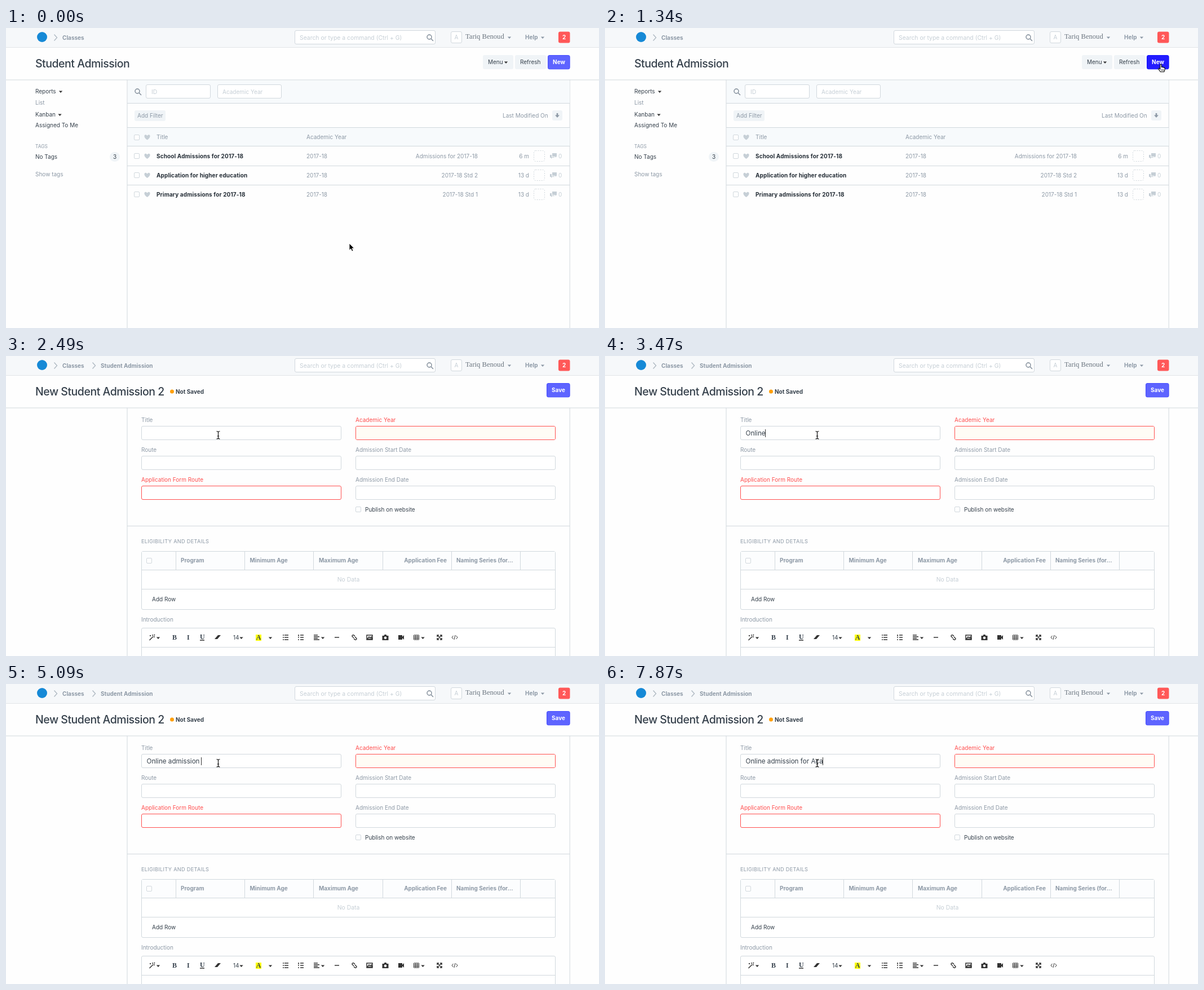
Animation of 1052 by 532 pixels, one loop 8 s. Source, as an HTML page:

```html
<!DOCTYPE html>
<html lang="en">
<head>
<meta charset="utf-8">
<title>Student Admission</title>
<style>
  html, body { margin: 0; width: 100%; height: 100%; overflow: hidden; background: #fefefe; }
  svg { display: block; width: 1052px; height: 532px; }
  text { font: 400 10px Inter, sans-serif; font-optical-sizing: none; fill: #36414c; white-space: pre; }
  .soft { fill: #8d99a6; }
  .pale { fill: #c6cfd6; }
  .red { fill: #ff4d4d; }
  .white { fill: #fff; }
  .bold { font-weight: 700; }
  .strong { font-weight: 700; letter-spacing: .12px; fill: #242d36; }
  .end { text-anchor: end; }
  .mid { text-anchor: middle; }
  .title { font-size: 19.5px; font-weight: 500; letter-spacing: -.48px; }
  .caps { font-size: 8.4px; }
  .section { font-size: 9.2px; letter-spacing: .3px; }
  .hint { font-size: 10.4px; }
  .user { font: 12.6px "Liberation Serif", serif; fill: #6c7680; }
  .typed { font-size: 11.65px; }
  .serif { font: bold 12px "Liberation Serif", serif; }
  .line { fill: none; stroke: #d1d8dd; }
  .faint { opacity: .6; }
  .box { fill: #fff; stroke: #d1d8dd; }
  .need { stroke: #ff4f4f; }
  .nav { fill: #f6f8fa; }
  .tint { fill: #f7fafc; }
  .head { fill: #fcfdfe; }
  .btn { fill: #f0f4f7; }
  .badge { fill: #ff5858; }
  .blue { fill: #5e64ff; stroke: #444bff; }
  .blue.hover { fill: #231cff; stroke: #0f10ff; }
  .ink { fill: #333; }
  .stroke { fill: none; stroke: #333; stroke-width: 1.5; }
  .lens { fill: none; stroke: #7c8895; stroke-width: 1.4; }
  .chevron { fill: none; stroke: #b0bac3; stroke-width: 1.4; }
</style>
</head>
<body>
<svg viewBox="0 0 1052 532">
  <g id="frame"></g>
  <g id="list"></g>
  <g id="form"></g>
  <g id="typing">
    <text id="typed" class="typed" x="249.5" y="141"></text>
    <rect id="caret" y="130" width="1" height="14" fill="#333"/>
  </g>
  <g id="arrow">
    <path d="M0 0V12.2L2.8 9.6L4.8 14L7 13L5 8.8H8.8Z" fill="#000" stroke="#fff" stroke-width=".9"/>
  </g>
  <g id="hand">
    <path d="M-1.2 0Q0-1.6 1.2 0V4.2Q2.6 3.4 3.4 4.7Q4.8 4 5.5 5.3Q7 5 7.2 6.6V9L5.8 12.8H-.6L-4.2 7.8Q-4 6-2.4 6.8L-1.2 8Z" fill="#fff" stroke="#000" stroke-width="1.1"/>
    <path d="M1.2 8.2V11M3.1 8.2V11M4.9 8.2V11" stroke="#000" stroke-width=".7"/>
  </g>
  <g id="beam">
    <path d="M-2.5-6.5Q.5-6.5.5-4.5Q.5-6.5 3.5-6.5M.5-5V6M-2.5 7Q.5 7 .5 5Q.5 7 3.5 7M-1.2 2H2.2" fill="none" stroke="#111" stroke-width="1.2"/>
  </g>
</svg>
<script>
const $ = id => document.getElementById(id);

// Drawing helpers; text is placed by the middle of its line.
const text = (x, y, str, cls = '') => `<text x="${x}" y="${y + 3.6}" class="${cls}">${str}</text>`;
const rect = (x, y, w, h, cls, r = 0) => `<rect x="${x}" y="${y}" width="${w}" height="${h}" rx="${r}" class="${cls}"/>`;
const box = (x, y, w, h, cls = 'box', r = 2.5) => rect(x + .5, y + .5, w - 1, h - 1, cls, r);
const path = (d, cls, x = 0, y = 0) => `<path d="${d}" class="${cls}" transform="translate(${x} ${y})"/>`;
const hline = (x, y, w, cls = 'line') => path(`M${x} ${y + .5}h${w}`, cls);
const vline = (x, y, h) => path(`M${x + .5} ${y}v${h}`, 'line');
const drop = (x, y, cls = 'ink') => path('M-3.2-1.5h6.4L0 2z', cls, x, y);
const lens = (x, y) => path('M3-1A4 4 0 1 1-5-1A4 4 0 1 1 3-1M2 2L6 6', 'lens', x, y);
const tick = (x, y) => box(x, y, 10, 10, 'box', 1.5);
const chevron = x => path('M-2.5-5.5L2.5 0L-2.5 5.5', 'chevron', x, 17);
const heart = (x, y) => path('M0 5C-9-1-4-7.5 0-2.5C4-7.5 9-1 0 5z', 'pale', x, y);
const chat = (x, y) => path('M-2-5h8v6h-1v2l-2-2h-5zM-6-2h3v4h5v1h-4l-2 2v-2h-2z', 'pale', x, y);

$('frame').innerHTML =
  rect(0, 0, 1052, 34, 'nav') + hline(0, 34, 1052, 'line faint') +
  '<circle cx="64" cy="16" r="9" fill="#1689d6"/>' +
  chevron(88) + text(100, 17, 'Classes', 'bold soft') +
  box(512, 4, 250, 25) + text(521, 17, 'Search or type a command (Ctrl + G)', 'hint pale') + lens(752, 17) +
  box(789, 6, 20, 21) + text(799, 16.5, 'A', 'pale mid') +
  text(815, 15.5, 'Tariq Benoud', 'user') + drop(893, 17, 'soft') +
  text(921, 16.5, 'Help', 'bold soft') + drop(952, 17, 'soft') +
  rect(980, 6.5, 20.5, 20, 'badge', 3) + text(990.2, 16.5, '2', 'bold white mid') +
  hline(0, 91.5, 1052) + vline(214.5, 92, 440) + vline(999.7, 92, 440);

const rows = [
  ['School Admissions for 2017-18', 'Admissions for 2017-18', '6 m'],
  ['Application for higher education', '2017-18 Std 2', '13 d'],
  ['Primary admissions for 2017-18', '2017-18 Std 1', '13 d']
];
const row = ([name, group, age], i) => {
  const y = 227 + 34 * i;
  return tick(227, y - 5) + heart(250.5, y) + text(267, y, name, 'strong') +
    text(533, y, '2017-18', 'soft') + text(837, y, group, 'soft end') + text(928, y, age, 'soft end') +
    `<rect x="936.5" y="${y - 9.5}" width="19" height="19" rx="3" class="line" stroke-dasharray="2 2"/>` +
    chat(971, y) + text(980, y + .5, '0', 'pale') + (i < 2 ? hline(215, y + 17, 785) : '');
};

$('list').innerHTML =
  text(52, 66, 'Student Admission', 'title') +
  rect(846, 48, 54, 25, 'btn', 3) + text(855, 60.5, 'Menu') + drop(887, 61) +
  rect(903, 48, 55, 25, 'btn', 3) + text(912, 60.5, 'Refresh') +
  '<g id="new" class="blue">' + box(961, 48, 39.6, 25.3, '') + '</g>' + text(981, 60.5, 'New', 'bold white mid" stroke="none') +
  text(52, 112, 'Reports') + drop(97, 113) + text(52, 132, 'List', 'soft') +
  text(52, 153, 'Kanban') + drop(95.5, 154) + text(52, 172.5, 'Assigned To Me') +
  text(52, 209.5, 'TAGS', 'caps soft') + text(52, 228.5, 'No Tags') +
  rect(184, 220, 18, 17, 'btn', 8.5) + text(193, 228.5, '3', 'mid') + text(52, 259, 'Show tags', 'soft') +
  rect(216, 93, 784, 40, 'tint') + hline(215, 133, 785) + lens(234, 113) +
  box(248, 100, 115, 25) + text(258, 113, 'ID', 'hint pale') +
  box(375, 100, 114, 25) + text(384, 113, 'Academic Year', 'pale') +
  rect(228, 146, 55, 19, 'btn', 3) + text(233, 155, 'Add Filter', 'soft') +
  text(881, 155, 'Last Modified On', 'soft') + rect(969, 146, 18, 18, 'btn', 3) +
  path('M-1.3-4h2.6v3.5h2.7L0 4L-4-.5h2.7z', 'soft', 978, 155) +
  hline(215, 176, 785) + rect(216, 177, 784, 32, 'tint') + hline(215, 209, 785) +
  tick(227, 189) + heart(250.5, 193.5) + text(267, 193.5, 'Title', 'soft') + text(533, 193.5, 'Academic Year', 'soft') +
  rows.map(row).join('');

const field = (x, y, label, need) =>
  text(x, y, label, need ? 'red' : 'soft') + box(x, y + 11, 355, 25, need ? 'box need' : 'box');

const tools =
  path('M-4.5 5L2-1.5M1-5v2.2M5-1H2.8M5-5L3.4-3.4M-3-4v2M-4-3h2', 'stroke', 259, 499) + drop(270, 500) +
  text(295, 499.5, 'B', 'serif') + text(321, 499.5, 'I', 'serif" font-style="italic') +
  text(344, 498.5, 'U', 'serif') + path('M-4 5h8', 'stroke', 348, 499) +
  path('M-5 3L1-4H6L0 3zM-4 4H2', 'ink', 375, 499) +
  text(403, 499, '14') + drop(417.5, 500) +
  '<rect x="443" y="494" width="10" height="11" fill="#ff0"/>' + text(448, 499.5, 'A', 'serif mid') + drop(469, 500) +
  path('M-5-4h2M-5 0h2M-5 4h2M-2-4h7M-2 0h7M-2 4h7', 'stroke', 496, 499) +
  path('M-4-5v3M-5 0h2M-5 4h2M-1-4h6M-1 0h6M-1 4h6', 'stroke', 523, 499) +
  path('M-5-4h7M-5-1.3h10M-5 1.4h7M-5 4h10', 'stroke', 551, 499) + drop(562, 500) +
  path('M-4 0h8', 'stroke', 587, 499) +
  path('M-1 1L-4-2Q-4-5-1-4L1-2M1-1L4 2Q4 5 1 4L-1 2', 'stroke', 618, 499) +
  path('M-5-4h10v8h-10zM-4 3L-1-1L1 1L3-1L4 3z', 'stroke', 645, 499) +
  path('M-5.5-3h3l1-2h3l1 2h3v8h-11zM0-1.5a2.3 2.3 0 1 0 .01 0z', 'ink" fill-rule="evenodd', 673, 499) +
  path('M-5-4h7v3L5-4V4L2 1v3h-7z', 'ink', 701, 499) +
  path('M-4.5-4h9v8h-9zM-4.5-1h9M-4.5 1.6h9M-1.5-4v8M1.5-4v8', 'stroke" style="stroke-width:1', 728, 499) + drop(739.5, 500) +
  path('M-4-4L4 4M4-4L-4 4M-4-1v-3h3M1-4h3v3M4 1v3h-3M-1 4h-3v-3', 'stroke', 769, 499) +
  path('M-2.5-3L-5 0L-2.5 3M2.5-3L5 0L2.5 3M1-4L-1 4', 'stroke" style="stroke-width:1', 796, 499);

$('form').innerHTML =
  text(52, 66, 'New Student Admission 2', 'title') +
  '<circle cx="294.5" cy="63" r="3.5" fill="#ffa00a"/>' + text(301, 63, 'Not Saved', 'bold') +
  box(959, 48, 41.6, 25.3, 'blue') + text(980, 60.5, 'Save', 'bold white mid') +
  chevron(156) + text(168, 17, 'Student Admission', 'bold soft') +
  field(240, 113, 'Title') + field(240, 166, 'Route') + field(240, 219, 'Application Form Route', true) +
  field(620, 113, 'Academic Year', true) + field(620, 166, 'Admission Start Date') + field(620, 219, 'Admission End Date') +
  '<rect id="warm" x="621" y="125" width="353" height="23" rx="2" fill="#fffcf5"/>' +
  tick(620, 267) + text(637, 272, 'Publish on website') + hline(215, 301, 785) +
  text(240, 328, 'ELIGIBILITY AND DETAILS', 'section soft') +
  box(240, 346, 735, 104) + rect(241, 347, 733, 32, 'head') + hline(240, 379, 734) + hline(240, 413, 734) +
  [301, 423, 545, 668, 790, 912].map(x => vline(x, 347, 32)).join('') +
  tick(249, 358) + text(310, 362.5, 'Program', 'bold soft') +
  text(432.5, 362.5, 'Minimum Age', 'bold soft') + text(555, 362.5, 'Maximum Age', 'bold soft') +
  text(782, 362.5, 'Application Fee', 'bold soft end') + text(799, 362.5, 'Naming Series (for…', 'bold soft') +
  text(607.5, 396.5, 'No Data', 'hint pale mid') + text(259, 431, 'Add Row') +
  text(240, 467, 'Introduction', 'soft') + box(240, 482, 735, 60) + hline(240, 516, 734) + tools;

// Typing: start time and content; "|" marks a visible caret.
const keys = [
  [1670, '|'], [2490, ''], [2740, 'O|'], [2900, 'On|'], [3150, 'Onl|'],
  [3310, 'Onli|'], [3390, 'Onlin|'], [3470, 'Online|'], [3550, '|'],
  [3800, 'O|'], [3880, 'On|'], [3960, 'Onl|'], [4040, 'Onlin|'], [4120, 'Online |'],
  [4370, 'Online a|'], [4450, 'Online ad|'], [4610, 'Online admi|'],
  [4770, 'Online admis|'], [4850, 'Online admiss|'], [4930, 'Online admissi|'],
  [5010, 'Online admission|'], [5090, 'Online admission |'], [5340, 'Online admission '],
  [5590, 'Online admission f|'], [5670, 'Online admission fo|'], [5750, 'Online admission for |'],
  [6080, 'Online admission for A|'], [6400, 'Online admission for A'],
  [6650, 'Online admission for As|'], [6810, 'Online admission for As |'], [7060, 'Online admission for As '],
  [7300, 'Online admission for As|'], [7380, 'Online admission for A|'], [7630, 'Online admission for A'],
  [7790, 'Online admission for Ac|'], [7870, 'Online admission for Aca|']
];

const show = (id, on) => $(id).style.display = on ? '' : 'none';
const clamp = v => Math.max(0, Math.min(1, v));
const ease = u => u * u * (3 - 2 * u);
const curve = (a, b, c, u) => a.map((v, i) => (1 - u) ** 2 * v + 2 * u * (1 - u) * b[i] + u * u * c[i]);

function pointer(t) {
  if (t < 1670) {
    const u = clamp((Math.floor((t - 760) / 82.8) + 1) / 8);
    return { at: curve([609, 382], [930, 200], [986, 65], ease(u)), kind: u === 1 ? 'hand' : 'arrow' };
  }
  const u = clamp(Math.floor((t - 1670) / 81.4) / 7);
  const at = curve([986, 65], [690, 130], [376, 140], ease(u));
  return { at, kind: u === 0 ? 'hand' : at[0] < 595 ? 'beam' : 'arrow' };
}

function draw(t) {
  const editing = t >= 1670;
  show('list', !editing);
  show('form', editing);
  show('typing', editing);
  show('warm', t >= 1750);

  const { at, kind } = pointer(t);
  for (const id of ['arrow', 'hand', 'beam']) show(id, id === kind);
  $(kind).setAttribute('transform', `translate(${at.map(Math.round)})`);
  $('new').classList.toggle('hover', kind === 'hand' && !editing);

  if (!editing) return;
  const state = keys.filter(k => k[0] <= t).pop()[1];
  const typed = state.replace('|', '');
  $('typed').textContent = typed;
  const width = typed ? $('typed').getComputedTextLength() : 0;
  $('caret').setAttribute('x', Math.floor(249.5 + width));
  show('caret', state.endsWith('|'));
}

const start = performance.now();
function run() {
  draw((performance.now() - start) % 8000);
  requestAnimationFrame(run);
}
run();
</script>
</body>
</html>
```
